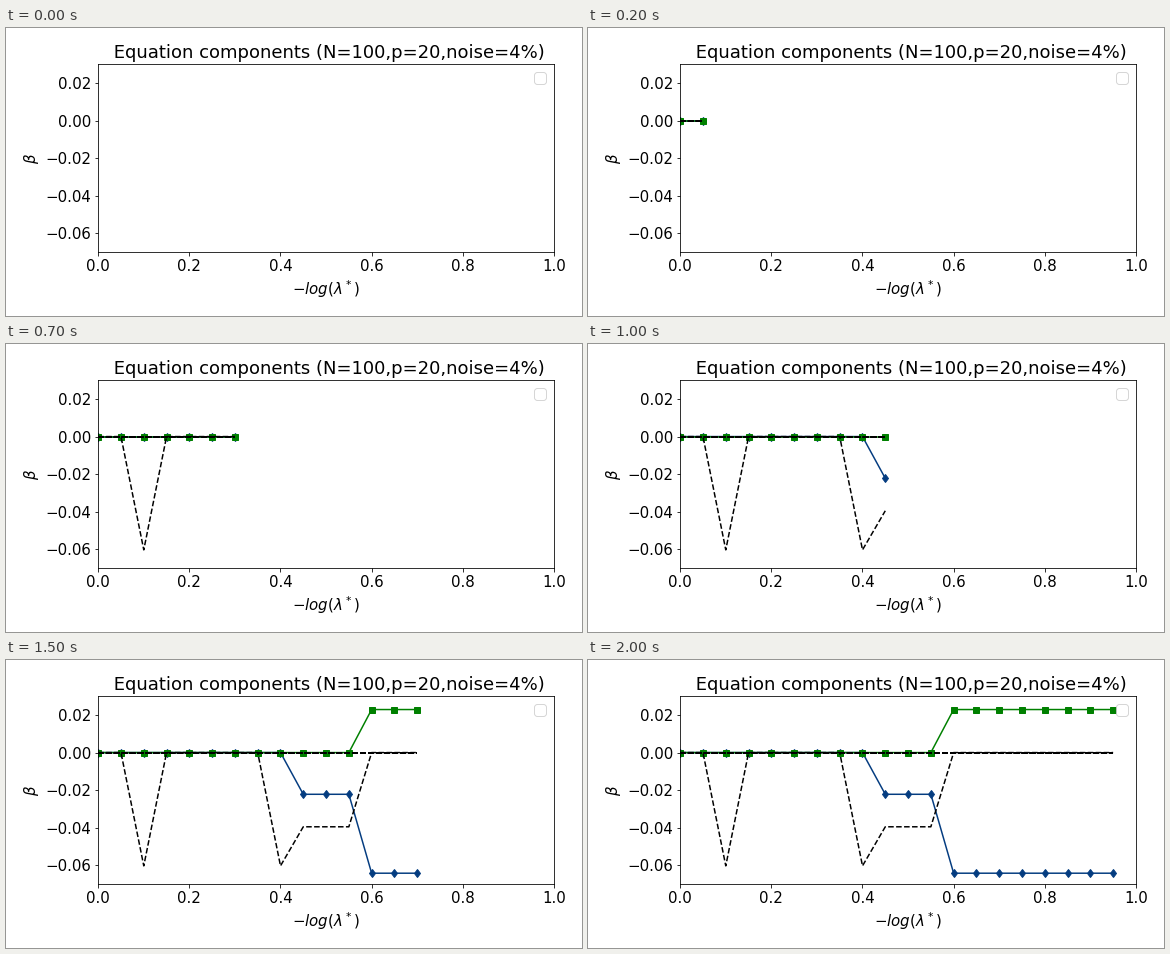
Animation, 576 px wide and 288 px high, one loop 4000 ms. Source, as a matplotlib script:

```python
import matplotlib.pyplot as plt
import numpy as np
from matplotlib.animation import FuncAnimation
from matplotlib.patches import Rectangle

plt.rcParams.update({"font.family": "DejaVu Sans", "font.size": 15,
                     "toolbar": "None"})

STEP_MS, FRAMES = 100, 40
POINTS = 20
DARK_FRAME = 1

x = 0.05 * np.arange(POINTS)


def levels(*steps):
    """Zero everywhere except on the given (first, last, value) index ranges."""
    y = np.zeros(POINTS)
    for first, last, value in steps:
        y[first:last + 1] = value
    return y


zero = levels()
dips = levels((2, 2, -0.0603), (8, 8, -0.0603), (9, 11, -0.0395))
blue = levels((9, 11, -0.0222), (12, 19, -0.0642))
green = levels((12, 19, 0.0229))

fig, ax = plt.subplots(figsize=(8, 4), dpi=72)
ax.set(xlim=(0, 1), ylim=(-0.07, 0.03))
ax.set_title(" Equation components (N=100,p=20,noise=4%)")
ax.set_xlabel(r"$-log(\lambda^*)$")
ax.set_ylabel(r"$\beta$")
ax.legend(handles=[], loc="upper right")
fig.tight_layout()

curves = []


def add_curve(y, **style):
    line, = ax.plot([], [], **style)
    curves.append((line, y))


dashed = dict(color="black", ls="--")
add_curve(blue, color="#043c80", marker="d")
add_curve(green, color="green", marker="s")
add_curve(dips, **dashed)
for _ in range(POINTS - 3):
    add_curve(zero, **dashed)

shade = Rectangle((0, 0), 1, 1, transform=fig.transFigure, color="black",
                  alpha=0.857, lw=0, zorder=100)
fig.add_artist(shade)


def draw(frame):
    count = min(frame, POINTS)
    for line, y in curves:
        line.set_data(x[:count], y[:count])
    shade.set_visible(frame == DARK_FRAME)
    return [line for line, _ in curves] + [shade]


anim = FuncAnimation(fig, draw, frames=FRAMES, interval=STEP_MS,
                     init_func=lambda: draw(0), repeat=True, repeat_delay=0)
plt.show()
```
